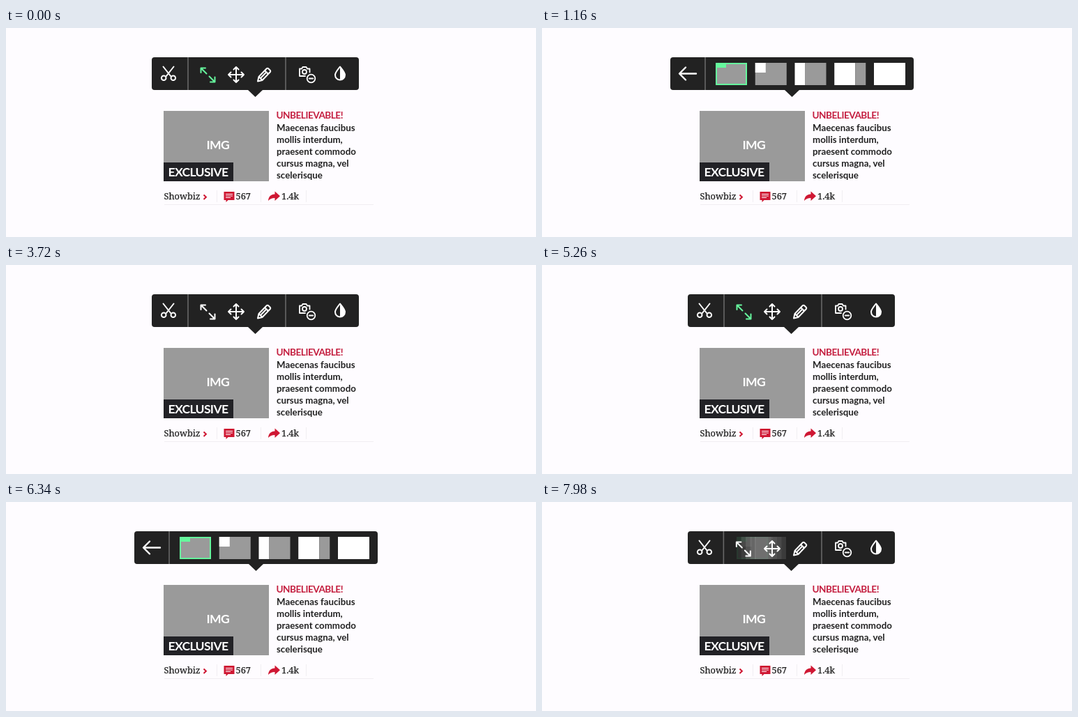
Recreate the animation shown at these times as an HTML page. Size 760x300 px, loop 8 s.

```html
<!DOCTYPE html>
<html lang="en">
<head>
<meta charset="utf-8">
<title>Toolbar</title>
<style>
  html, body { margin: 0; width: 100%; height: 100%; overflow: hidden; background: #fefcff; }
  svg { display: block; width: 760px; height: 300px; }
  text { font-family: Lato, "Open Sans", sans-serif; font-weight: 700; fill: #222; }
  .label { fill: #fff; font-size: 17.6px; letter-spacing: -.7px; }
  .copy text { font-size: 13.3px; }
  .copy .title { fill: #c41e3f; font-size: 13.6px; letter-spacing: -.5px; }
  .footer text { font: 500 12.8px "Noto Serif", serif; stroke: #222; stroke-width: .25; }
  .line { fill: none; stroke: #fff; stroke-width: 2; stroke-linecap: round; stroke-linejoin: round; }
  .rule { stroke: #686868; stroke-width: 1.6; }
  .hair { stroke: #f1eef2; stroke-width: 1; }
</style>
</head>
<body>
<svg viewBox="0 0 760 300">
  <rect width="760" height="300" fill="#fefcff"/>

  <rect x="226" y="119" width="151" height="101" fill="#9a9a9a"/>
  <text class="label" x="287.500" y="174">IMG</text>
  <rect x="226" y="193" width="100" height="27" fill="#222226"/>
  <text class="label" x="232.500" y="213">EXCLUSIVE</text>

  <g class="copy">
    <text class="title" x="387.500" y="130">UNBELIEVABLE!</text>
    <text x="388" y="148">Maecenas faucibus</text>
    <text x="388" y="165">mollis interdum,</text>
    <text x="388" y="182">praesent commodo</text>
    <text x="388" y="199">cursus magna, vel</text>
    <text x="388" y="216">scelerisque</text>
  </g>

  <g class="footer">
    <text x="226.500" y="246">Showbiz</text>
    <path d="M283.5 239.5l3.4 3.2-3.4 3.2" fill="none" stroke="#cf1733" stroke-width="2"/>
    <path d="M312.500 235h15v12h-9l-3 3v-3h-3z" fill="#cf1733"/>
    <path d="M315 238.5h10M315 241h10M315 243.5h7" stroke="#fefcff" stroke-width="1"/>
    <text x="329.500" y="246">567</text>
    <path d="M376 248c.5-6 4-9.500 9.500-9.500v-4l7.500 6.700-7.500 6.700v-4c-4 0-7 1-9.500 4.100z" fill="#cf1733"/>
    <text x="395" y="246">1.4k</text>
    <path class="hair" d="M302.500 233v17M365.500 233v17M430.500 233v17M227 253.500h300"/>
  </g>

  <rect id="bar" y="42" height="47" rx="4" fill="#222"/>
  <path id="tip" d="M-11 88.500h22l-11 10.500z" fill="#222"/>
  <path id="divider" class="rule" d="M0 42v47"/>
  <g id="thumbs"></g>

  <g id="scissors" class="line">
    <path d="M225.500 55.500l11 14M240.500 55.500l-11 14"/>
    <circle cx="226.200" cy="71.800" r="3.300"/><circle cx="239.800" cy="71.800" r="3.300"/>
  </g>
  <path id="back" class="line" style="stroke-width:2.400" d="M221 65.500h-23.500M206 56.500l-9 9 9 9"/>
  <path id="resize" class="line" d="M279.500 64v-6.500h6.500M280 58l7.500 7.500M299.500 70.500v7h-6.500M299 77l-7.500-7.500"/>

  <g id="tools">
    <path class="rule" d="M401 42v47"/>
    <path class="line" d="M319 67h22M330 56v22M322.500 63.500l-3.500 3.500 3.500 3.500M337.500 63.500l3.500 3.500-3.500 3.500M326.500 59.500l3.500-3.500 3.500 3.500M326.500 74.500l3.500 3.500 3.500-3.500"/>
    <path class="line" d="M361 76.500l1.500-6.500 11-11.500q1.500-1.500 3 0l2 2q1.500 1.500 0 3l-11 11.500zM371 61l5 5M363 70.500l4.500 4.300M366 71l7.500-7.700"/>
    <g class="line" style="stroke-width:1.800">
      <path d="M429 69h-8v-10.500h3l1.500-2.500h5l1.500 2.500h3.500v5"/>
      <circle cx="428" cy="63" r="3"/>
      <circle cx="437.500" cy="72.500" r="5.800"/>
      <path d="M434.700 72.500h5.600"/>
    </g>
    <path class="line" d="M479 55.500c4 5 7 8 7 12a7 7 0 0 1-14 0c0-4 3-7 7-12z"/>
    <path d="M479 55.500c4 5 7 8 7 12a7 7 0 0 1-7 7z" fill="#fff"/>
  </g>
</svg>
<script>
const LOOP = 8000, SLIDE = 400, RETURN = 300, SNAP = 60;
const GREEN = '#66f79d', GREY = '#9a9a9a', WHITE = '#fff';
const visits = [
  { hover: -100, open: 760, backHover: 2860, close: 3310 },
  { hover: 5100, open: 5683, backHover: 7420, close: 7740 }
];
const $ = id => document.getElementById(id);
const clamp = v => Math.max(0, Math.min(1, v));
const mix = (a, b, p) => a + (b - a) * p;

// cubic-bezier(.25, .1, .25, 1)
function ease(x) {
  const curve = (a, b, s) => 3 * a * s * (1 - s) ** 2 + 3 * b * s * s * (1 - s) + s ** 3;
  let lo = 0, hi = 1;
  for (let i = 0; i < 20; i++) {
    const mid = (lo + hi) / 2;
    if (curve(.25, .25, mid) < x) lo = mid; else hi = mid;
  }
  return curve(.1, 1, (lo + hi) / 2);
}

const rect = (w, h, fill, x = 0) => `<rect x="${x}" width="${w}" height="${h}" fill="${fill}"/>`;
const layouts = [
  rect(45, 32, GREY) + rect(15, 7, GREEN) +
    `<rect x="1" y="1" width="43" height="30" fill="none" stroke="${GREEN}" stroke-width="2"/>`,
  rect(45, 32, GREY) + rect(15, 14, WHITE),
  rect(15, 32, WHITE) + rect(30, 32, GREY, 15),
  rect(30, 32, WHITE) + rect(15, 32, GREY, 30),
  rect(45, 32, WHITE)
];
$('thumbs').innerHTML = layouts.map(s => `<g>${s}</g>`).join('');
const thumbs = [...$('thumbs').children];

function draw(t) {
  const visit = visits.find(v => t < v.close + SLIDE) || visits[1];
  const progress = (openSpan, closeSpan) => t < visit.close
    ? ease(clamp((t - visit.open) / openSpan))
    : 1 - ease(clamp((t - visit.close) / closeSpan));
  const snap = progress(SNAP, SNAP);
  const move = progress(SLIDE, RETURN);
  const spread = progress(SLIDE, SLIDE);

  $('bar').setAttribute('x', mix(209, 184, snap));
  $('bar').setAttribute('width', mix(297, 349, snap));
  $('tip').setAttribute('transform', `translate(${mix(357.5, 358.5, snap)})`);
  $('divider').setAttribute('transform', `translate(${mix(261, 234, move)})`);

  thumbs.forEach((el, i) => {
    el.setAttribute('transform', `translate(${mix(280, 249, move) + i * 56.75 * spread} 50)`);
    el.setAttribute('opacity', spread);
  });

  $('scissors').setAttribute('opacity', 1 - snap);
  $('back').setAttribute('opacity', snap);
  $('back').style.stroke = t >= visit.backHover ? GREEN : WHITE;
  $('resize').setAttribute('transform', `translate(${-28 * move})`);
  $('resize').setAttribute('opacity', 1 - move * move);
  $('resize').style.stroke = t >= visit.hover && t < visit.close ? GREEN : WHITE;
  $('tools').setAttribute('opacity', clamp(1.4 - 3 * move));
}

const start = performance.now();
function tick() {
  draw((performance.now() - start) % LOOP);
  requestAnimationFrame(tick);
}
tick();
</script>
</body>
</html>
```
